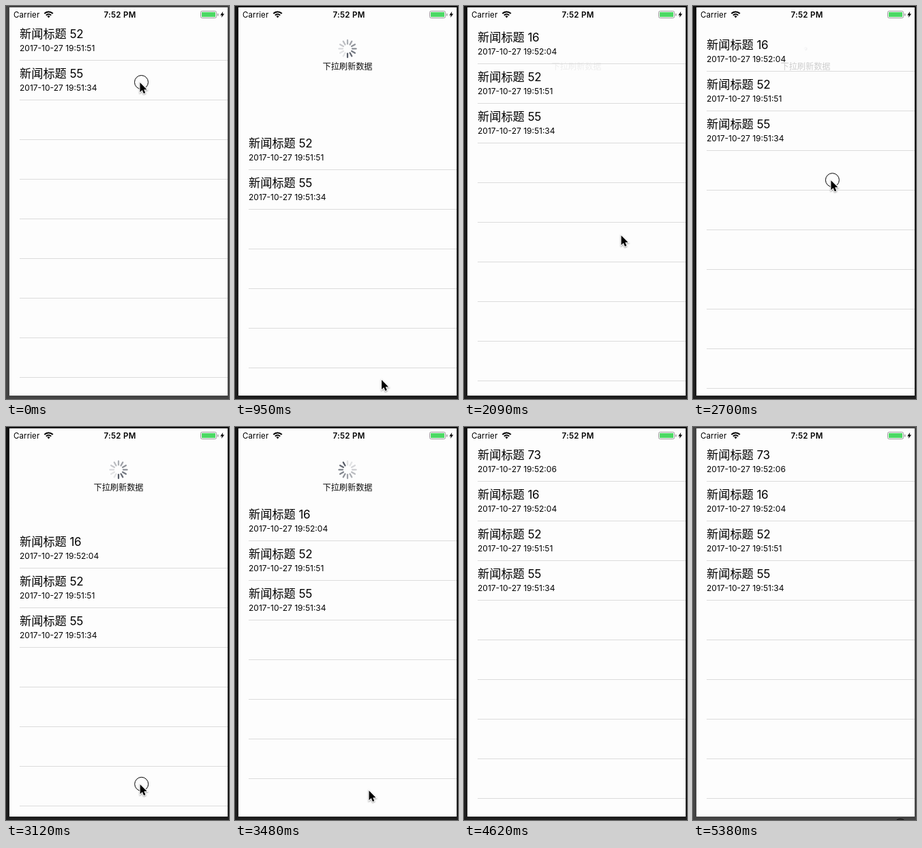
An HTML page with a canvas that plays this animation: 327x575 px, repeating every 5.48 s.

```html
<!DOCTYPE html>
<html lang="zh-CN">
<head>
<meta charset="utf-8">
<style>
  html, body { margin: 0; width: 327px; height: 575px; overflow: hidden; }
  canvas { display: block; }
</style>
</head>
<body>
<canvas width="327" height="575"></canvas>
<script>
const ctx = document.querySelector('canvas').getContext('2d');
const FONT = 'Inter, "Noto Sans CJK SC", "Noto Sans CJK", sans-serif';
const LOOP = 5480, STEP = 87.2, BLUR = 5380;
const HOLD = 82, HEIGHT = 568, COLLAPSE = 400;

const NEWS = [
  [55, '2017-10-27 19:51:34'], [52, '2017-10-27 19:51:51'],
  [16, '2017-10-27 19:52:04'], [73, '2017-10-27 19:52:06'],
];
// Each pull: finger down and up times, end of refresh, finger y range
const PULLS = [
  { down: 430, up: 907, done: 1750, y0: 112, y1: 547 },
  { down: 2609, up: 3103, done: 3898, y0: 226, y1: 532 },
];
// Pointer moves: start, end, target x, target y
const MOVES = [
  [430, 907, 215, 547], [1040, 1480, 247, 401], [1790, 2520, 203, 226],
  [2609, 3103, 196.5, 532], [4130, 4620, 302, 584],
];

const clamp = x => Math.max(0, Math.min(1, x));
const smooth = x => (x = clamp(x), x * x * (3 - 2 * x));
const rubber = d => (1 - 1 / (d * 0.55 / HEIGHT + 1)) * HEIGHT;

function pullOffset(p, t) {
  if (t < p.down || t > p.done + COLLAPSE) return 0;
  if (t < p.up) return rubber((p.y1 - p.y0) * smooth((t - p.down) / (p.up - p.down)));
  if (t > p.done) return HOLD * (1 - smooth((t - p.done) / COLLAPSE));
  const u = (t - p.up) * 0.0102;
  return HOLD + (rubber(p.y1 - p.y0) - HOLD) * (1 + u) * Math.exp(-u);
}

function pointerAt(t) {
  let x = 196.5, y = 112;
  for (const [start, end, tx, ty] of MOVES) {
    const k = smooth((t - start) / (end - start));
    x += (tx - x) * k;
    y += (ty - y) * k;
  }
  return [x, y];
}

function text(str, x, y, size, { weight = 400, align = 'left', spacing = 0, color = '#000' } = {}) {
  ctx.font = `${weight} ${size}px ${FONT}`;
  ctx.textAlign = align;
  ctx.letterSpacing = spacing + 'px';
  ctx.fillStyle = color;
  ctx.fillText(str, x, y);
}

function polygon(points, x, y) {
  ctx.beginPath();
  points.forEach(([px, py]) => ctx.lineTo(x + px, y + py));
  ctx.closePath();
}

function frame(focused) {
  if (focused) {
    const g = ctx.createLinearGradient(0, 0, 0, 575);
    g.addColorStop(0, '#111');
    g.addColorStop(1, '#1e1e1e');
    ctx.fillStyle = g;
  } else ctx.fillStyle = '#444';
  ctx.fillRect(0, 0, 327, 575);
  ctx.fillStyle = '#fdfdfd';
  ctx.fillRect(5, 2, 320, 568);
}

function statusBar() {
  text('Carrier', 11, 16.5, 11.5, { spacing: 0.1 });
  text('7:52 PM', 167, 16.5, 11.5, { weight: 600, align: 'center', spacing: 0.3 });

  ctx.strokeStyle = '#000';
  ctx.lineWidth = 2;
  for (const r of [5, 8.5]) {
    ctx.beginPath();
    ctx.arc(62.5, 17, r, -Math.PI * 0.76, -Math.PI * 0.24);
    ctx.stroke();
  }
  ctx.fillStyle = '#000';
  ctx.beginPath();
  ctx.moveTo(62.5, 17.5);
  ctx.arc(62.5, 17, 2.8, -Math.PI * 0.76, -Math.PI * 0.24);
  ctx.fill();

  ctx.strokeStyle = '#999';
  ctx.lineWidth = 1;
  ctx.beginPath();
  ctx.roundRect(285.5, 7.5, 23, 10, 2);
  ctx.stroke();
  ctx.fillStyle = '#999';
  ctx.fillRect(310, 11, 1.4, 3.5);
  ctx.fillStyle = '#4cd964';
  ctx.fillRect(287, 9, 20, 7);
  ctx.fillStyle = '#000';
  polygon([[4, 0], [0, 5.4], [2.5, 5.4], [1.6, 9], [6, 3.6], [3.4, 3.6]], 314.2, 8);
  ctx.fill();
}

function header(offset, lead) {
  const amount = clamp(offset / HOLD);
  if (!amount) return;
  ctx.save();
  ctx.globalAlpha = amount;
  text('下拉刷新数据', 165, 93, 12.2, { align: 'center', color: '#111' });
  ctx.translate(165, 62.5);
  ctx.scale(amount, amount);
  ctx.strokeStyle = '#565b66';
  ctx.lineWidth = 2.2;
  ctx.lineCap = 'round';
  for (let i = 0; i < 12; i++) {
    const angle = (lead - i) * Math.PI / 6, s = Math.sin(angle), c = -Math.cos(angle);
    ctx.globalAlpha = amount * Math.max(0.16, 1 - i * 0.085);
    ctx.beginPath();
    ctx.moveTo(s * 7, c * 7);
    ctx.lineTo(s * 12.6, c * 12.6);
    ctx.stroke();
  }
  ctx.restore();
}

function list(offset, count) {
  ctx.fillStyle = '#dcdcdc';
  for (let y = 79 + offset; y < 570; y += 58) ctx.fillRect(20, y, 305, 1);
  NEWS.slice(0, count).reverse().forEach(([id, date], i) => {
    const y = offset + i * 58;
    text('新闻标题', 20, y + 47, 17.2);
    text(id, 93.5, y + 47, 17, { spacing: -0.4 });
    text(date, 20, y + 66, 12);
  });
}

function pointer(x, y, pressed) {
  if (pressed) {
    ctx.strokeStyle = '#000';
    ctx.lineWidth = 1;
    ctx.beginPath();
    ctx.arc(x + 2, y - 0.5, 10, 0, 7);
    ctx.stroke();
  }
  polygon([[0, 0], [0, 14], [3.2, 11.1], [5.4, 16], [7.8, 15], [5.7, 10.2], [10, 10.2]], x, y);
  ctx.save();
  ctx.shadowColor = 'rgba(0,0,0,.4)';
  ctx.shadowBlur = 2;
  ctx.shadowOffsetY = 1;
  ctx.strokeStyle = '#fff';
  ctx.lineWidth = 2;
  ctx.stroke();
  ctx.restore();
  ctx.fillStyle = '#000';
  ctx.fill();
}

function draw(now) {
  const time = now % LOOP;
  const t = Math.floor((time + 10) / STEP) * STEP;
  const blurred = time >= BLUR;
  const offset = Math.round(PULLS.reduce((sum, p) => sum + pullOffset(p, t), 0));
  const active = PULLS.find(p => t >= p.up && t < p.done);
  const lead = 6 + (active ? Math.floor((t - active.up) / 69) : 0);
  const pressed = t < STEP || blurred || PULLS.some(p => t >= p.down && t < p.up);

  frame(t >= 340 && !blurred);
  header(offset, lead);
  list(offset, 2 + PULLS.filter(p => t >= p.done).length);
  statusBar();
  pointer(...pointerAt(t), pressed);
}

const start = performance.now();
function tick() {
  draw(performance.now() - start);
  requestAnimationFrame(tick);
}
tick();
</script>
</body>
</html>
```
